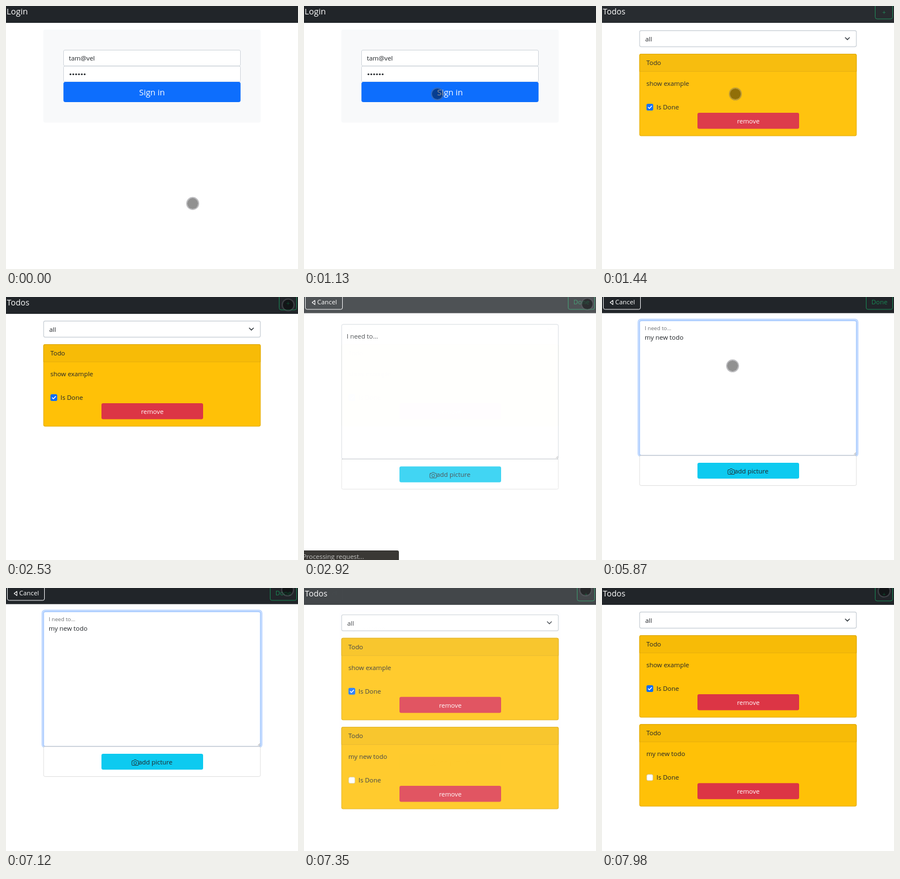
Recreate the animation shown at these times as an HTML page. Size 520x468 px, loop 8 s.

```html
<!DOCTYPE html>
<html lang="en">
<head>
<meta charset="utf-8">
<title>Todo app</title>
<style>
html, body { margin: 0; width: 520px; height: 468px; overflow: hidden; background: #fff; }
svg { display: block; }
text { font: 11.4px "Open Sans", "Noto Sans", sans-serif; fill: #212529; white-space: pre; }
.big { font-size: 14.9px; }
.title { font-size: 14.4px; }
.white { fill: #fff; }
.green { fill: #198754; }
.mid { text-anchor: middle; }
</style>
</head>
<body>
<svg id="stage" width="520" height="468" viewBox="0 0 520 468"></svg>
<script>
const LOOP = 8000;
const stage = document.getElementById('stage');

const rect = (x, y, w, h, fill, r = 0, more = '') =>
  `<rect x="${x}" y="${y}" width="${w}" height="${h}" rx="${r}" fill="${fill}" ${more}/>`;
const text = (x, y, s, cls = '', more = '') =>
  `<text x="${x}" y="${y}" class="${cls}" ${more}>${s}</text>`;
const line = (d, color, w = 1) =>
  `<path d="${d}" fill="none" stroke="${color}" stroke-width="${w}" stroke-linecap="round" stroke-linejoin="round"/>`;
const outline = (x, y, w, h, color, r = 3, fill = 'none', more = '') =>
  rect(x, y, w, h, fill, r, `stroke="${color}" ${more}`);
const header = h => rect(0, 0, 520, h, '#212529');
const page = (head, body) => `<g class="page">${head}<g class="body">${body}</g></g>`;

function login() {
  let dots = '';
  for (let i = 0; i < 6; i++) dots += `<circle cx="${114.8 + i * 5.05}" cy="121.5" r="1.6" fill="#212529"/>`;
  return page(header(30) + text(1, 15, 'Login', 'big'.concat(' white')),
    rect(66.5, 42, 387, 165.5, '#f8f9fa', 3.5) +
    outline(102.5, 78.5, 315, 28, '#ced4da', 2.5, '#fff') + text(112, 97, 'tam@vel') +
    outline(102.5, 107, 315, 28, '#ced4da', 2.5, '#fff') + dots +
    rect(102.3, 135, 315.4, 36, '#0d6efd', 3.5) + text(260, 159, 'Sign in', 'big white mid'));
}

function card(y, label, done) {
  const box = done
    ? rect(79.2, 89, 12, 12, '#0d6efd', 2.5) + line('M82.4 95.2l2 2l4-4.2', '#fff', 1.5)
    : outline(79.7, 89.5, 11, 11, '#d5c9a0', 2.5, '#fff');
  return `<g transform="translate(0 ${y})">` +
    rect(66.5, 0, 387, 146.5, '#ffc107', 3) +
    `<path d="M66.5 31.5V3a3 3 0 0 1 3-3h381a3 3 0 0 1 3 3v28.5z" fill="#f7bb07"/>` +
    rect(67, 31, 386, 1, '#e8b00c') +
    outline(67, .5, 386, 145.5, '#000', 3, 'none', 'stroke-opacity=".12"') +
    text(79, 20, 'Todo') + text(79, 57, label) + box + text(97, 99, 'Is Done') +
    rect(170, 105, 181, 28.5, '#dc3545', 3) + text(260.5, 124, 'remove', 'white mid') + '</g>';
}

const list = cards => page(
  header(30) + text(1.5, 15, 'Todos', 'title white') +
  outline(486.5, -5.5, 31, 28.5, '#198754', 3.5) + text(502.2, 15, '+', 'green mid'),
  outline(67, 42.8, 386, 28.7, '#ced4da', 3, '#fff', 'stroke-width="1.4"') + text(77, 62, 'all') +
  line('M433.3 55.2l3.7 3.7l3.7-3.7', '#343a40', 1.5) + cards);

const edit = () => page(
  header(28.7) +
  outline(2.5, -5.5, 66, 27.5, '#f8f9fa', 3) + line('M19.5 6v7.6l-5-3.8z', '#fff', 1.1) +
  text(23.5, 13, 'Cancel', 'white') +
  outline(470.5, -5.5, 47, 27.5, '#198754', 3) + text(494, 13, 'Done', 'green mid'),
  outline(65, 40.2, 390, 243, '#0d6efd', 4.5, 'none', 'id="ring" stroke-width="3.4"') +
  outline(67, 42.2, 386, 239.5, '#ced4da', 3, '#fff', 'id="area"') +
  line('M449 280l3-3M451 280.3l1.2-1.2', '#888', .8) +
  '<g id="label">' + text(0, 0, 'I need to...') + '</g>' +
  text(76, 76, '', '', 'id="typed"') + rect(76, 64, 1, 15.5, '#212529', 0, 'id="caret"') +
  outline(67, 282, 386, 53.5, '#dfdfdf', 2.5, '#fff') + rect(67, 281.4, 386, 1, '#c4c8cc') +
  rect(170, 295, 181, 28.3, '#0dcaf0', 3) +
  line('M225.2 307.5h2l1.3-1.8h3.2l1.3 1.8h2a1 1 0 0 1 1 1v6a1 1 0 0 1-1 1h-9.8a1 1 0 0 1-1-1v-6a1 1 0 0 1 1-1z', '#212529', .9) +
  '<circle cx="230.1" cy="311.3" r="2.5" fill="none" stroke="#212529" stroke-width=".9"/>' +
  text(236, 314, 'add picture'));

const first = card(84, 'show example', true);
stage.innerHTML = rect(0, 0, 520, 468, '#fff') +
  login() + list(first) + edit() + list(first + card(242.3, 'my new todo', false)) +
  '<g id="status">' + rect(-5, 451, 174, 25, '#3a3835', 3) +
  text(-2.5, 466, 'Processing request...', '', 'style="fill:#c4c4c2"') + '</g>' +
  '<g id="pointer"><circle r="9.6" fill="#000" fill-opacity=".43"/>' +
  '<circle r="10.5" fill="none" stroke="#64646c" stroke-opacity=".42" stroke-width="2.1"/></g>';

const $ = id => document.getElementById(id);
const set = (el, name, v) => el.setAttribute(name, v);
const clamp = v => Math.max(0, Math.min(1, v));
const smooth = v => { v = clamp(v); return v * v * (3 - 2 * v); };
const fade = (t, start) => t < start ? 0 : t > start + 620 ? 1 : 1 - Math.exp((start - t) / 88);

// when each page comes in; the one before leaves at the same moment
const starts = [-1000, 1140, 2786, 7190];
const pages = [...document.querySelectorAll('.page')].map((el, i) =>
  ({ el, body: el.querySelector('.body'), from: starts[i], to: starts[i + 1] || 2 * LOOP }));

// time, x, y of the pointer
const track = [
  [0, 332.5, 351.5], [70, 330, 346], [180, 311, 309], [320, 275, 239], [460, 249, 184],
  [580, 238.5, 162.5], [750, 238.5, 157.5], [900, 237.5, 156.5], [1530, 237.5, 156.5],
  [1620, 268, 143], [1830, 417.5, 74.5], [1990, 467, 40], [2200, 494, 20], [2610, 504.5, 12.5],
  [2960, 504.5, 12.5], [3070, 462, 30], [3260, 276, 103], [3390, 237.5, 119.5],
  [5800, 237.5, 119.5], [5870, 232.5, 122.5], [5980, 236, 129], [6120, 272, 113],
  [6400, 440, 37], [6540, 487, 14], [6660, 501, 7], [6970, 501.5, 3.5],
  [7750, 501.5, 3.5], [7980, 502.5, 5.5], [LOOP, 502.5, 5.5]];

function pointerAt(t) {
  const i = track.findIndex(k => k[0] > t);
  const [a, b] = [track[i - 1], track[i]];
  const p = (t - a[0]) / (b[0] - a[0]);
  return [a[1] + (b[1] - a[1]) * p, a[2] + (b[2] - a[2]) * p];
}

const words = 'my new todo';
const keys = [4210, 4380, 4450, 4620, 4770, 4920, 4920, 5090, 5240, 5330, 5410];
const blinks = [3490, 4040, 4210, 5870, 6370, 6890];
const mix = (a, b, p) => `rgb(${a.map((v, i) => Math.round(v + (b[i] - v) * p))})`;

function drawForm(t) {
  const focus = smooth((t - 3490) / 220);
  const lift = smooth((t - 3490) / 100);
  set($('ring'), 'stroke-opacity', .25 * focus);
  set($('area'), 'stroke', mix([206, 212, 218], [134, 183, 254], focus));
  set($('label'), 'transform', `translate(76 ${68 - 9 * lift}) scale(${1 - .15 * lift})`);
  set($('label'), 'opacity', 1 - .35 * lift);
  const typed = $('typed');
  typed.textContent = words.slice(0, keys.filter(k => k <= t).length);
  set($('caret'), 'x', 76 + Math.round(typed.textContent ? typed.getComputedTextLength() : 0));
  set($('caret'), 'opacity', blinks.filter(b => b <= t).length % 2);
}

function draw(t) {
  for (const { el, body, from, to } of pages) {
    const come = fade(t, from);
    const alpha = come * (1 - fade(t, to)) ** 2;
    set(el, 'opacity', alpha);
    set(el, 'display', alpha > .002 ? 'inline' : 'none');
    set(body, 'transform', `translate(0 ${Math.min(20, 30 * (1 - come))})`);
  }
  drawForm(t);
  set($('status'), 'opacity', t < 2830 ? 0 : 1 - smooth((t - 3200) / 190));
  set($('pointer'), 'transform', `translate(${pointerAt(t)})`);
}

const begin = performance.now();
function tick() {
  draw((performance.now() - begin) % LOOP);
  requestAnimationFrame(tick);
}
tick();
</script>
</body>
</html>
```
